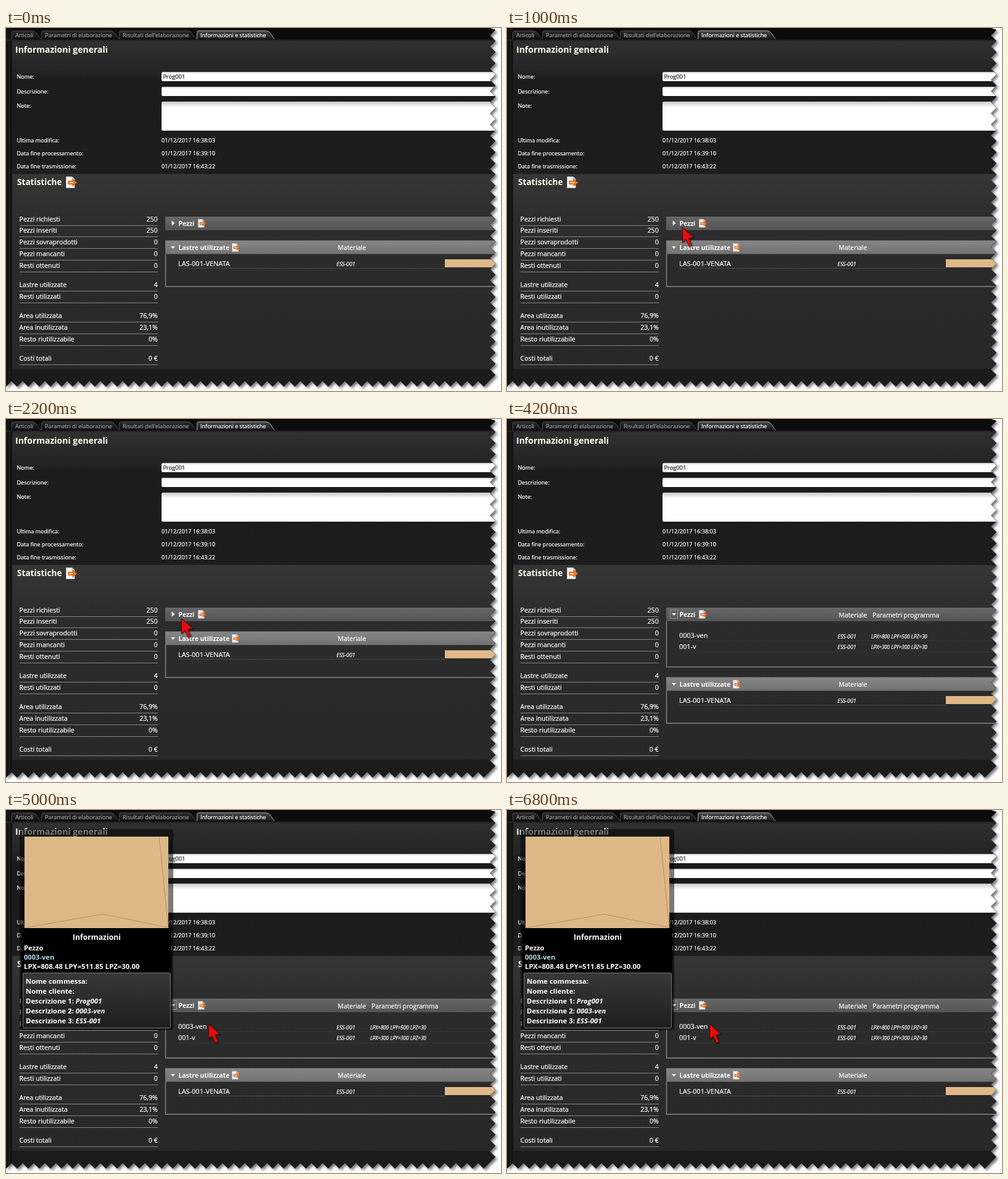
An HTML page that plays this animation: 802 by 587 pixels, repeating every 8 s.

```html
<!DOCTYPE html>
<html lang="it">
<head>
<meta charset="utf-8">
<title>Informazioni e statistiche</title>
<style>
  html, body { margin: 0; width: 100%; height: 100%; overflow: hidden; background: #fff; }
  svg { display: block; }
  text { font-family: "Open Sans", "Noto Sans", sans-serif; white-space: pre; stroke-width: .22; }
  .b { font-weight: 700; stroke-width: 0; }
  .i { font-style: italic; }
</style>
</head>
<body>
<svg id="stage" width="802" height="587" viewBox="0 0 802 587"></svg>
<script>
const LOOP = 8000;
const W = 802;

// Basic shapes
const text = (x, y, size, str, cls = "", fill = "#fff", anchor = "start") =>
  `<text x="${x}" y="${y}" font-size="${size}" class="${cls}" fill="${fill}" stroke="${fill}" text-anchor="${anchor}">${str}</text>`;
const rect = (x, y, w, h, fill, more = "") =>
  `<rect x="${x}" y="${y}" width="${w}" height="${h}" fill="${fill}" ${more}/>`;
const path = (d, fill, stroke = "none", more = "") =>
  `<path d="${d}" fill="${fill}" stroke="${stroke}" ${more}/>`;
const line = (x1, x2, y, color) => rect(x1, y, x2 - x1, 1, color);
const group = (id, body) => `<g id="${id}">${body}</g>`;
const gradient = (id, ...stops) =>
  `<linearGradient id="${id}" x1="0" y1="0" x2="0" y2="1">` +
  stops.map(([at, color]) => `<stop offset="${at}" stop-color="${color}"/>`).join("") +
  `</linearGradient>`;

// Sawtooth outline along the right and bottom edges
function tornEdge() {
  const right = 784, bottom = 571, step = 18, depth = 9;
  let d = "M0 0H" + right;
  for (let y = 3; y < bottom; y += step)
    d += `L${right + depth} ${y}L${right} ${y + step / 2}`;
  for (let x = right - 1; x > 0; x -= step)
    d += `L${x} ${bottom}L${x - step / 2} ${bottom + depth}`;
  return d + `L0 ${bottom}Z`;
}

function tab(x, w, label, active) {
  const d = `M${x} 18V7Q${x} 4.5 ${x + 3} 4.5H${x + w - 14}Q${x + w - 9} 4.5 ${x + w - 6} 10Q${x + w - 3} 16 ${x + w} 18`;
  return path(d, active ? "url(#tabOn)" : "url(#tabOff)", active ? "#aaa" : "#484848") +
    text(x + 5.5, 14.5, 9.05, label, "", active ? "#fff" : "#9b9b9b");
}

const exportIcon = (x, y, k) => `<g transform="translate(${x} ${y}) scale(${k})">` +
  path("M.5 .5H10L14 4.5V18.5H.5Z", "#f7f7f7", "#b9b9b9") +
  path("M10 .5V4.5H14", "#ddd", "#aaa") +
  path("M4 7.5H11V4.5L18 10L11 15.5V12.5H4Z", "#f07a20", "#c8500c") +
  path("M5.5 9H11.5V11H5.5Z", "#ffd9b0") + `</g>`;

const field = (y, h) => rect(252, y, W, h, "url(#field)", 'rx="2.5"');

const arrowRight = path("M268.5 311V320L273.5 315.5Z", "#e8e8e8");
const arrowDown = y => path(`M267 ${y}H274L270.5 ${y + 4}Z`, "#f0f0f0");

const header = (y, h, fill, label) =>
  rect(258, y, W, h, `url(#${fill})`) +
  text(279.5, y + 15.3, 10.35, label, "b", "#fff");

const frame = (top, bottom) =>
  path(`M258.5 ${top}V${bottom}H${W}`, "none", "#858585", 'stroke-width="1.4"');

function statistics() {
  const rows = [
    [312.5, "Pezzi richiesti", "250"], [331, "Pezzi inseriti", "250"],
    [350.3, "Pezzi sovraprodotti", "0"], [369.3, "Pezzi mancanti", "0"],
    [388, "Resti ottenuti", "0"], [419, "Lastre utilizzate", "4"],
    [438, "Resti utilizzati", "0"], [468.5, "Area utilizzata", "76,9%"],
    [487.5, "Area inutilizzata", "23,1%"], [506.5, "Resto riutilizzabile", "0%"],
    [537.5, "Costi totali", "0 €"]
  ];
  return rows.map(([y, label, value]) =>
    text(21.5, y, 10.6, label) + text(245.7, y, 10.6, value, "", "#fff", "end") +
    line(22, 246, Math.round(y + 6), "#858585")).join("");
}

const piece = (y, name, size) =>
  text(279, y, 10.8, name) +
  text(535.5, y + .8, 8.7, "ESS-001", "i") +
  text(590, y + .8, 8.1, size, "i");

const page =
  rect(0, 0, W, 587, "#1b1b1b") +
  rect(0, 0, W, 20, "#0b0b0b") +
  rect(0, 0, 10, 587, "#131313") + rect(5, 20, 1, 567, "#292929") +
  rect(10, 21, W, 215, "url(#upper)") +
  rect(10, 236, W, 315, "url(#lower)") +
  line(0, W, 19, "#303030") +
  tab(9.5, 47, "Articoli") + tab(57.5, 126, "Parametri di elaborazione") +
  tab(183.5, 125, "Risultati dell'elaborazione") +
  tab(309.5, 126, "Informazioni e statistiche", true) +
  text(15, 40, 14, "Informazioni generali", "b", "#fffef0") +
  text(17.5, 82.3, 9.05, "Nome:") + text(17.5, 106.3, 9.05, "Descrizione:") +
  text(17.5, 128.8, 9.05, "Note:") +
  field(71, 15) + field(95, 15) + field(119, 47) +
  text(254.5, 82.3, 9.25, "Prog001", "", "#222") +
  [[184.6, "Ultima modifica:", "38:03"], [205.7, "Data fine processamento:", "39:10"],
   [226.6, "Data fine trasmissione:", "43:22"]].map(([y, label, time]) =>
    text(17.5, y, 9.03, label) + text(252, y, 9.13, "01/12/2017 16:" + time)).join("") +
  text(18, 254, 13.6, "Statistiche", "b", "#fffef0") +
  exportIcon(97, 240, 1) + statistics();

const piecesHeader = header(305, 22, "barDim", "Pezzi") + exportIcon(311, 309, .72);

const piecesOpen =
  arrowDown(314) +
  rect(264.5, 308.5, 12, 14, "none", 'stroke="#bbb" stroke-dasharray="1 1"') +
  text(537.5, 320.6, 10.4, "Materiale") + text(592.3, 320.6, 10.4, "Parametri programma") +
  frame(327, 401) +
  line(279, W, 358, "#343434") + line(279, W, 376, "#343434") +
  piece(353.7, "0003-ven", "LPX=800 LPY=500 LPZ=30") +
  piece(371.6, "001-v", "LPX=300 LPY=300 LPZ=30");

const sheets =
  header(343.5, 22, "barLight", "Lastre utilizzate") + exportIcon(366, 348, .72) +
  arrowDown(353) + text(537.5, 359, 10.4, "Materiale") + frame(365, 418) +
  line(279, 711, 388, "#4b4b4b") +
  text(279, 384.7, 10.95, "LAS-001-VENATA") + text(535.5, 385.3, 8.7, "ESS-001", "i") +
  rect(711, 374, W, 13, "#deb887");

const detail = (y, label, value = "") =>
  text(32, y, 11.33, `${label}: <tspan class="i">${value}</tspan>`, "b", "#fff");

const tooltip =
  rect(22, 31, 249, 325, "#000", 'rx="3" fill-opacity=".52"') +
  rect(25, 191, 243, 162, "#000") +
  rect(30, 43, 233, 148, "#deb887") +
  path("M248 43L263 190L157 168.5L30 190.5", "none", "#b08c64", 'stroke-width=".9"') +
  text(147, 209.5, 12.2, "Informazioni", "b", "#fff", "middle") +
  text(29, 227, 11.2, "Pezzo", "b", "#fff") +
  text(29, 242, 11.15, "0003-ven", "b", "#b5e4ee") +
  text(29, 256.7, 11.37, "LPX=808.48 LPY=511.85 LPZ=30.00", "b", "#fff") +
  rect(27.5, 263.5, 239, 89, "url(#info)", 'stroke="#777" rx="1"') +
  detail(281, "Nome commessa") + detail(297, "Nome cliente") +
  detail(313, "Descrizione 1", "Prog001") + detail(329, "Descrizione 2", "0003-ven") +
  detail(345, "Descrizione 3", "ESS-001");

const pointer = path("M0 0L18.5 16.5L10.5 17.5L15.5 29L11.5 31L6 19.5L.5 24.5Z", "#e80c0c", "#4a0606",
  'style="filter:drop-shadow(1px 1.5px 1px #0009)"');

const stage = document.getElementById("stage");
stage.innerHTML = `<defs>
  <clipPath id="torn"><path d="${tornEdge()}"/></clipPath>
  ${gradient("tabOn", [0, "#4a4a4a"], [1, "#161616"])}
  ${gradient("tabOff", [0, "#2c2c2c"], [1, "#0e0e0e"])}
  ${gradient("field", [0, "#c8c8c8"], [.2, "#fff"], [1, "#fff"])}
  ${gradient("upper", [0, "#303030"], [.24, "#232323"], [.3, "#1b1b1b"], [1, "#1d1d1d"])}
  ${gradient("lower", [0, "#363636"], [.25, "#2c2c2c"], [1, "#282828"])}
  ${gradient("barDim", [0, "#686868"], [1, "#545454"])}
  ${gradient("barLight", [0, "#868686"], [1, "#727272"])}
  ${gradient("info", [0, "#383838"], [1, "#1e1e1e"])}
</defs>
<g style="filter:drop-shadow(3px 3px 2px #0008)"><g clip-path="url(#torn)">` +
  page + piecesHeader + group("closed", arrowRight) + group("open", piecesOpen) +
  group("sheets", sheets) + group("tip", tooltip) + group("pointer", pointer) + `</g></g>`;

const part = id => document.getElementById(id);
const show = (id, on) => part(id).setAttribute("visibility", on ? "visible" : "hidden");

function draw() {
  const t = performance.now() % LOOP;
  const open = t >= 3000, hover = t >= 5000;
  show("closed", !open);
  show("open", open);
  show("tip", hover);
  show("pointer", hover || (t >= 1000 && !open));
  part("sheets").setAttribute("transform", `translate(0 ${open ? 74 : 0})`);
  part("pointer").setAttribute("transform", hover ? "translate(328 346)" : "translate(284 322.5)");
  requestAnimationFrame(draw);
}
draw();
</script>
</body>
</html>
```
